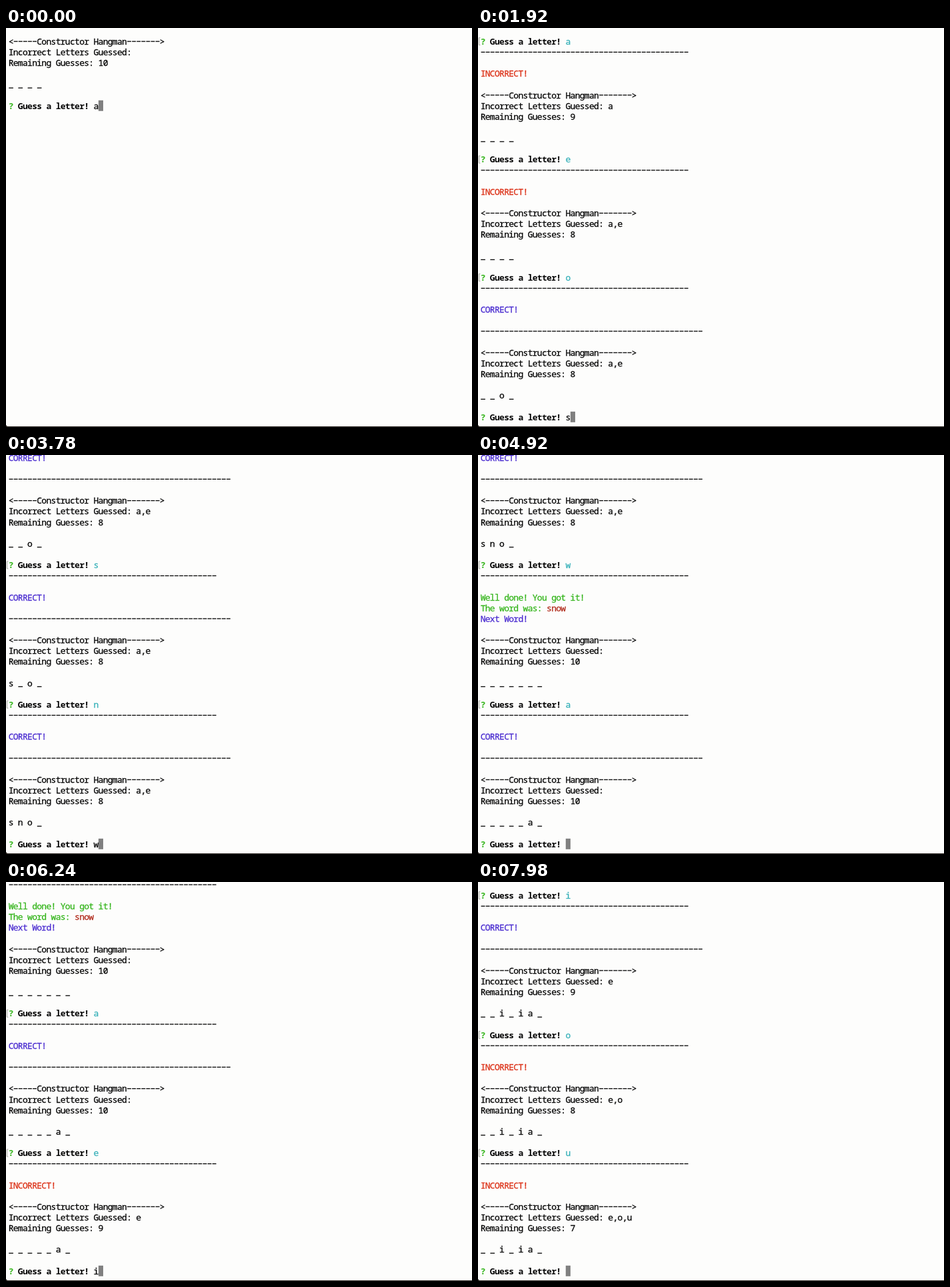
Animation of 700x600 px, one loop 8 s. Source, as an HTML page with a canvas:

```html
<!DOCTYPE html>
<html lang="en">
<head>
<meta charset="utf-8">
<title>Constructor Hangman</title>
<style>
  html, body { margin: 0; width: 100%; height: 100%; overflow: hidden; background: #fdfdfc; }
  canvas { display: block; }
</style>
</head>
<body>
<canvas id="stage" width="700" height="600"></canvas>
<script>
const ctx = document.getElementById('stage').getContext('2d');
const LOOP = 8000, ROWS = 37, LEFT = 4, CELL = 7.1, LINE = 16.14;
const FONT = '13px "Noto Sans Mono", "DejaVu Sans Mono", monospace';
const COLOR = {
  paper: '#fdfdfc', ink: '#050505', green: '#35b51c', cyan: '#35b0b8', red: '#dc3218',
  blue: '#4a2cd0', brick: '#b02a1a', cursor: '#808080', mark: '#a8a8a0', edge: '#2b2520'
};
// Hidden letters of the second word are never revealed.
const WORDS = ['snow', '**i*ia*'];

// [letter, typed at, submitted at]
const GUESSES = [
  ['a', 0, 60], ['e', 720, 900], ['o', 1320, 1500], ['s', 1920, 2160],
  ['n', 2820, 3000], ['w', 3720, 4020], ['a', 4320, 4740], ['e', 5460, 5580],
  ['i', 6180, 6300], ['o', 6720, 7020], ['u', 7740, 7860]
];

const span = (text, color = COLOR.ink, bold = false) => ({ text, color, bold });
const row = (text, color) => [span(text, color)];
const rule = n => row('-'.repeat(n));
const prompt = () => [span('? ', COLOR.green, true), span('Guess a letter! ', COLOR.ink, true)];

function board(game) {
  const shown = [...game.word].map(c => game.hits.includes(c) ? c : '_').join(' ');
  return [
    row('<-----Constructor Hangman------->'),
    row('Incorrect Letters Guessed: ' + game.misses.join(',')),
    row('Remaining Guesses: ' + (10 - game.misses.length)),
    [], row(shown), []
  ];
}

function newGame(word) {
  return { word, hits: [], misses: [] };
}

function play(game, letter) {
  if (!game.word.includes(letter)) {
    game.misses.push(letter);
    return [row('INCORRECT!', COLOR.red), []];
  }
  game.hits.push(letter);
  if ([...game.word].some(c => !game.hits.includes(c)))
    return [row('CORRECT!', COLOR.blue), [], rule(47), []];
  const won = game.word;
  Object.assign(game, newGame(WORDS[1]));
  return [
    row('Well done! You got it!', COLOR.green),
    [span('The word was: ', COLOR.green), span(won, COLOR.brick)],
    row('Next Word!', COLOR.blue), []
  ];
}

function screenAt(t) {
  const game = newGame(WORDS[0]);
  const lines = [[], ...board(game)];
  let typed = '';
  for (const [letter, typedAt, sentAt] of GUESSES) {
    if (t < sentAt) {
      if (t >= typedAt) typed = letter;
      break;
    }
    const answered = [...prompt(), span(letter, COLOR.cyan)];
    answered.marked = true;
    lines.push(answered, rule(44), [], ...play(game, letter), ...board(game));
  }
  lines.push([...prompt(), span(typed)]);
  return lines.slice(-ROWS);
}

function drawChar(c, x, y, bold) {
  if (c === '-') ctx.fillRect(x + 0.6, y - 0.6, 5.9, 1.3);
  else if (c === '_') ctx.fillRect(x + 0.2, y + 4.8, 6.7, 1.3);
  else if (c !== ' ') {
    ctx.fillText(c, x + CELL / 2, y + 4.7);
    if (!bold) ctx.strokeText(c, x + CELL / 2, y + 4.7);
  }
}

function drawMark(y) {
  ctx.strokeStyle = COLOR.mark;
  ctx.lineWidth = 1;
  ctx.beginPath();
  ctx.moveTo(3.5, y - 5.5);
  ctx.lineTo(1.5, y - 5.5);
  ctx.lineTo(1.5, y + 5.5);
  ctx.lineTo(3.5, y + 5.5);
  ctx.stroke();
}

function drawLine(line, y) {
  let x = LEFT;
  if (line.marked) drawMark(y);
  ctx.lineWidth = 0.3;
  for (const { text, color, bold } of line) {
    ctx.fillStyle = ctx.strokeStyle = color;
    ctx.font = (bold ? 'bold ' : '') + FONT;
    for (const c of text) {
      drawChar(c, x, y, bold);
      x += CELL;
    }
  }
  return x;
}

function drawEdge() {
  ctx.fillStyle = COLOR.edge;
  ctx.fillRect(0, 599, 700, 1);
  ctx.beginPath();
  ctx.moveTo(0, 597);
  ctx.lineTo(3, 600);
  ctx.lineTo(0, 600);
  ctx.fill();
}

function draw(t) {
  ctx.fillStyle = COLOR.paper;
  ctx.fillRect(0, 0, 700, 600);
  ctx.textAlign = 'center';
  let x = LEFT, y = 4;
  screenAt(t).forEach((line, i) => {
    y = 4 + i * LINE;
    x = drawLine(line, y);
  });
  ctx.fillStyle = COLOR.cursor;
  ctx.fillRect(x, y - 8.2, CELL, 16);
  drawEdge();
}

const start = performance.now();
function tick() {
  draw((performance.now() - start) % LOOP);
  requestAnimationFrame(tick);
}
tick();
</script>
</body>
</html>
```
